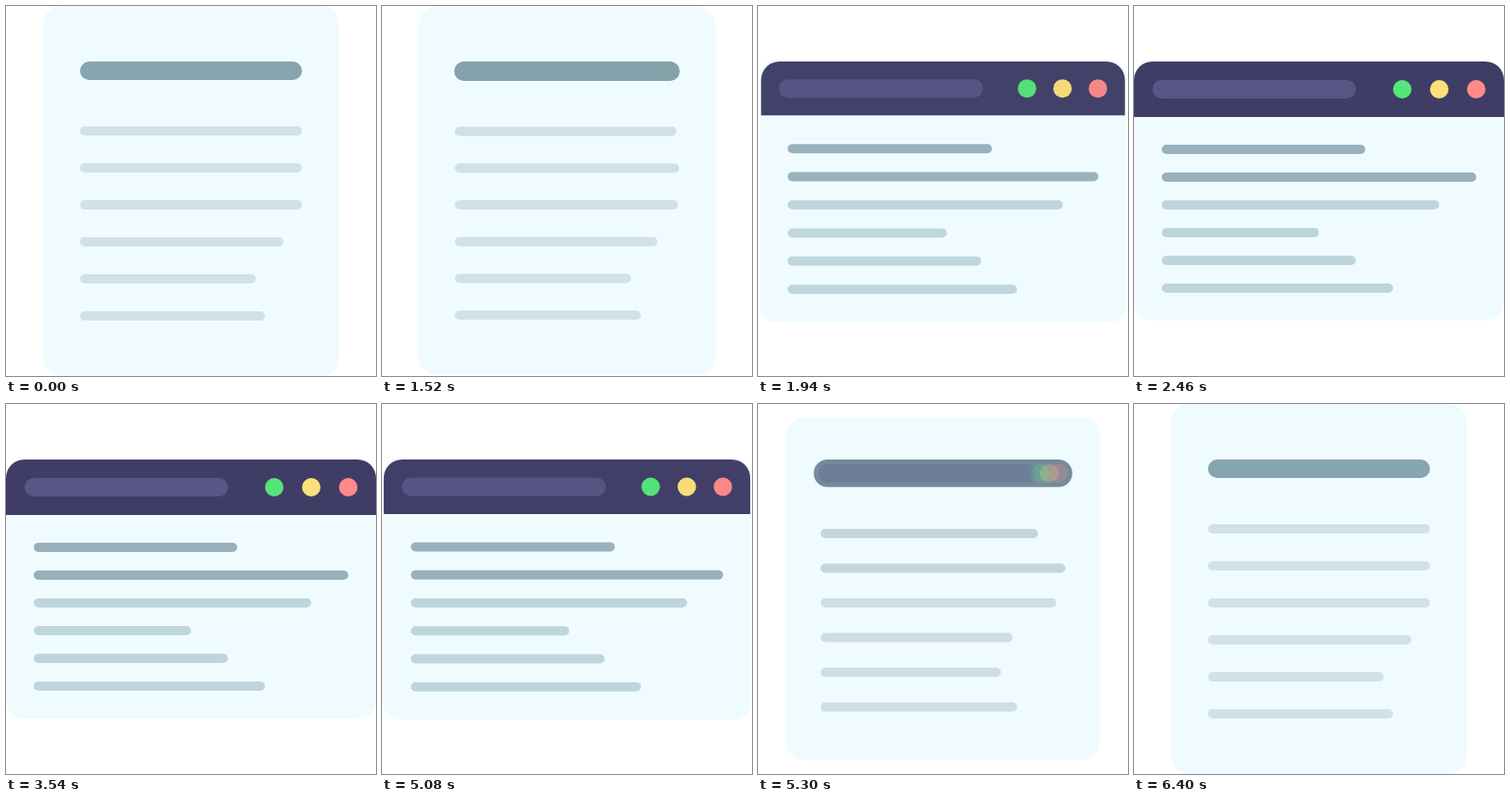
Recreate the animation shown at these times as an HTML page. Size 400 by 400 pixels, loop 7.2 s.

```html
<!DOCTYPE html>
<html lang="en">
<head>
<meta charset="utf-8">
<title>Document to browser</title>
<style>
  html, body { margin: 0; width: 100%; height: 100%; overflow: hidden; background: #fff; }
  svg { display: block; width: 100%; height: 100%; }
</style>
</head>
<body>
<svg id="stage" viewBox="0 0 400 400"></svg>
<script>
const LOOP = 7200, OPEN = 1500, CLOSE = 5060;
const RATE = 11.25; // critically damped spring, per second

const stage = document.getElementById('stage');

function add(tag, attrs) {
  const el = document.createElementNS('http://www.w3.org/2000/svg', tag);
  set(el, attrs);
  stage.appendChild(el);
  return el;
}

function set(el, attrs) {
  for (const key in attrs) el.setAttribute(key, attrs[key]);
}

const mix = (a, b, p) => a + (b - a) * p;
const blend = (a, b, p) => `rgb(${a.map((v, i) => Math.round(mix(v, b[i], p)))})`;

function spring(ms) {
  if (ms <= 0) return 0;
  const x = RATE * ms / 1000;
  return 1 - Math.exp(-x) * (1 + x);
}

const PALE = [209, 225, 233], DARK = [151, 176, 187], MID = [191, 213, 222];
const BAR = [135, 165, 175], TITLE = [63, 61, 102];

const panel = add('rect', { rx: 20, fill: '#effbff' });
const header = add('path', {});
const address = add('rect', { height: 20, rx: 10, fill: '#575684' });

const dots = [[290, '#54e67a'], [330, '#fce07a'], [370, '#ff8a88']].map(([x, fill]) => ({
  x, el: add('circle', { r: 10, fill })
}));

// right edge in the document, right edge in the browser, browser colour
const lines = [
  [320, 250, DARK], [320, 370, DARK], [320, 330, MID],
  [300, 200, MID], [270, 240, MID], [280, 280, MID]
].map(([from, to, color], i) => ({
  from, to, color, y0: 130 + 40 * i, y1: 150 + 30 * i,
  el: add('rect', { height: 10, rx: 5 })
}));

function headerPath(x, y, w, h, top, bottom) {
  return `M${x} ${y + top}a${top} ${top} 0 0 1 ${top} ${-top}` +
    `h${w - 2 * top}a${top} ${top} 0 0 1 ${top} ${top}` +
    `V${y + h - bottom}a${bottom} ${bottom} 0 0 1 ${-bottom} ${bottom}` +
    `h${2 * bottom - w}a${bottom} ${bottom} 0 0 1 ${-bottom} ${-bottom}Z`;
}

function draw(time) {
  const p = spring(time - OPEN) - spring(time - CLOSE);

  set(panel, {
    x: mix(40, 0, p), y: mix(0, 60, p),
    width: mix(320, 400, p), height: mix(400, 280, p)
  });

  const h = mix(20, 60, p);
  set(header, {
    d: headerPath(mix(80, 0, p), 60, mix(240, 400, p), h,
      Math.min(20, h / 2), Math.min(mix(20, 0, p), h / 2)),
    fill: blend(BAR, TITLE, p)
  });

  set(address, {
    x: mix(80, 20, p), y: mix(60, 80, p), width: mix(240, 220, p), opacity: p
  });

  for (const dot of dots) {
    set(dot.el, { cx: mix(310, dot.x, p), cy: mix(70, 90, p), opacity: p });
  }

  for (const line of lines) {
    const x = mix(80, 30, p);
    set(line.el, {
      x, y: mix(line.y0, line.y1, p),
      width: mix(line.from, line.to, p) - x,
      fill: blend(PALE, line.color, p)
    });
  }
}

const start = performance.now();
function tick() {
  draw((performance.now() - start) % LOOP);
  requestAnimationFrame(tick);
}
tick();
</script>
</body>
</html>
```
